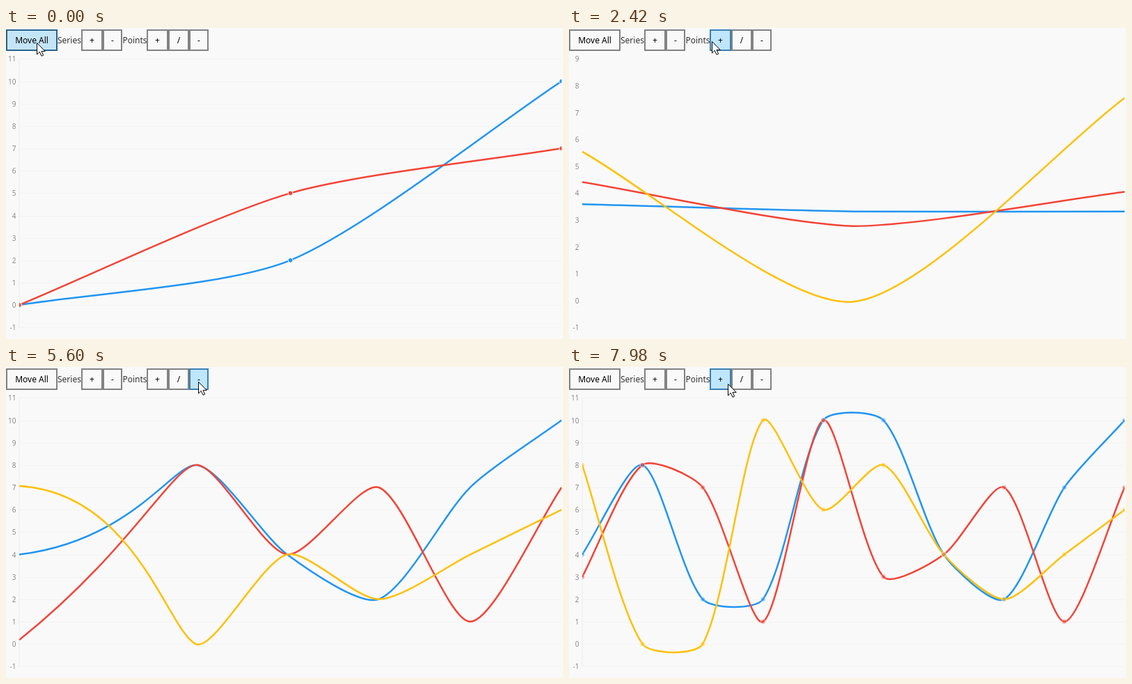
Recreate the animation shown at these times as an HTML page with a canvas. Size 800 by 447 pixels, loop 8 s.

```html
<!DOCTYPE html>
<html lang="en">
<head>
<meta charset="utf-8">
<title>Line chart</title>
<style>
html, body { margin: 0; width: 100%; height: 100%; overflow: hidden; background: #f9f9f9; }
canvas { display: block; }
</style>
</head>
<body>
<canvas id="stage" width="800" height="447"></canvas>
<script>
const ctx = document.getElementById('stage').getContext('2d');
const LOOP = 8000, MOVE = 500, FADE = 400;
const TOP = 44.4, BOTTOM = 430.3, RIGHT = 798;
const COLORS = ['#2195f2', '#f34336', '#fec007'];
const BACK = '#f9f9f9';

// label, left, right
const BUTTONS = [
  ['Move All', 0, 74], ['+', 108, 139], ['-', 139, 167],
  ['+', 202, 233], ['/', 233, 263], ['-', 263, 291]
];

// time, x, y of the pointer tip
const PATH = [
  [0, 44, 21], [200, 44, 21], [640, 118, 18], [900, 118, 18], [1500, 46, 20],
  [2190, 46, 20], [2420, 205, 19], [2520, 214, 21], [3200, 216, 21],
  [3560, 279, 22], [4400, 279, 22], [4900, 277, 21], [5620, 276, 21],
  [6250, 247, 18], [7350, 247, 18], [7700, 228, 24], [8000, 228, 24]
];

// Rows hold one value per series
const START = [[0, 0], [2, 5], [10, 7]];
const set = rows => () => rows;
const add = row => rows => [...rows, row];
const drop = rows => rows.slice(1);
const insert = row => rows => [...rows.slice(0, 2), row, ...rows.slice(2)];

// click time, button, press length, kind, change
const CLICKS = [
  [190, 0, 190, 'set', set([[8, 1], [3, 4], [3, 9]])],
  [860, 1, 90, 'series', rows => rows.map((r, i) => [...r, [9, 0, 9][i]])],
  [2170, 0, 100, 'set', set([[0, 8, 3], [4, 2, 0], [4, 0, 7]])],
  [2550, 3, 70, 'add', add([4, 3, 8])],
  [2680, 3, 70, 'add', add([8, 8, 0])],
  [2810, 3, 70, 'add', add([4, 4, 4])],
  [2935, 3, 70, 'add', add([2, 7, 2])],
  [3060, 3, 70, 'add', add([7, 1, 4])],
  [3180, 3, 70, 'add', add([10, 7, 6])],
  [4350, 5, 180, 'drop', drop],
  [4960, 5, 100, 'drop', drop],
  [5570, 5, 100, 'drop', drop],
  [6460, 4, 100, 'insert', insert([10, 3, 8])],
  [6760, 4, 100, 'insert', insert([10, 10, 6])],
  [7050, 4, 100, 'insert', insert([2, 1, 10])],
  [7320, 4, 100, 'insert', insert([2, 7, 0])]
];

const clamp = v => Math.max(0, Math.min(1, v));
const mix = (a, b, k) => Array.isArray(a) ? a.map((v, i) => mix(v, b[i], k)) : a + (b - a) * k;
const endOf = part => part.slice(-2);
const still = p => [...p, ...p, ...p];

function axisOf(rows) {
  const all = rows.flat();
  const lo = Math.min(...all) - 1, hi = Math.max(...all) + 1;
  return { lo, hi, left: lo < 0 ? 19 : 21.5 };
}

const yOf = (v, axis) => BOTTOM - (v - axis.lo) / (axis.hi - axis.lo) * (BOTTOM - TOP);

// Control points of the smooth segment from b to c
function segment(a, b, c, d) {
  const dist = (p, q) => Math.hypot(p[0] - q[0], p[1] - q[1]);
  const l1 = dist(a, b), l2 = dist(b, c), l3 = dist(c, d);
  const ab = mix(a, b, 0.5), bc = mix(b, c, 0.5), cd = mix(c, d, 0.5);
  const m1 = mix(ab, bc, l1 / (l1 + l2)), m2 = mix(bc, cd, l2 / (l2 + l3));
  const pull = (p, m) => p.map((v, i) => v + (bc[i] - m[i]) * 0.5);
  return [...pull(b, m1), ...pull(c, m2), ...c];
}

// A curve is its start point followed by Bezier segments
function curves(rows, axis) {
  const step = (RIGHT - axis.left) / (rows.length - 1);
  return rows[0].map((_, s) => {
    const p = rows.map((r, i) => [axis.left + i * step, yOf(r[s], axis)]);
    const at = i => p[Math.max(0, Math.min(p.length - 1, i))];
    return p.map((q, i) => i ? segment(at(i - 2), at(i - 1), q, at(i + 1)) : q);
  });
}

// Reshape the current curves so they pair up with the next ones
function pair(now, kind, next) {
  if (kind === 'series')
    return [...now, next[2].map(part => part.map((v, i) => i % 2 ? BOTTOM : v))];
  return now.map(c => {
    if (kind === 'add') return [...c, still(endOf(c[c.length - 1]))];
    if (kind === 'drop') return [c[0], ...c.slice(2)];
    if (kind === 'insert') return [...c.slice(0, 3), still(endOf(c[2])), ...c.slice(3)];
    return c;
  });
}

const shapeAt = (stage, t) => mix(stage.from, stage.to, clamp((t - stage.time) / MOVE));

function buildStages() {
  let rows = START, axis = axisOf(rows), to = curves(rows, axis);
  const list = [{ time: -LOOP, gridTime: -LOOP, axis, from: to, to }];
  for (const [time, , , kind, change] of CLICKS) {
    const last = list[list.length - 1];
    rows = change(rows);
    axis = axisOf(rows);
    to = curves(rows, axis);
    const same = axis.lo === last.axis.lo && axis.hi === last.axis.hi;
    list.push({
      time, axis, to,
      gridTime: same ? last.gridTime : time,
      from: pair(shapeAt(last, time), kind, to)
    });
  }
  return list;
}
const stages = buildStages();

function pointerAt(t) {
  const i = Math.max(1, PATH.findIndex(p => p[0] > t));
  const [t0, ...a] = PATH[i - 1], [t1, ...b] = PATH[i];
  const k = clamp((t - t0) / (t1 - t0));
  return mix(a, b, k * k * (3 - 2 * k));
}

function text(str, x, y, size, color, align) {
  ctx.font = size + 'px "Noto Sans", "Open Sans", sans-serif';
  ctx.textAlign = align;
  ctx.textBaseline = 'alphabetic';
  ctx.fillStyle = color;
  ctx.fillText(str, x, y);
}

function drawAxis({ axis, gridTime }, t) {
  const { lo, hi, left } = axis;
  ctx.globalAlpha = clamp((t - gridTime - 300) / 200);
  ctx.fillStyle = '#f3f3f3';
  for (let v = lo; v <= hi; v++) ctx.fillRect(left, Math.round(yOf(v, axis)), RIGHT - left, 1);
  ctx.fillRect(Math.floor(left) - 1, 44, 2, 387);
  ctx.globalAlpha = 1;
  for (let v = lo; v <= hi; v++) text(String(v), left - 4.5, yOf(v, axis) + 4, 10, '#8a8a8a', 'right');
}

function drawSeries(stage, t) {
  ctx.save();
  ctx.beginPath();
  ctx.rect(stage.axis.left, 34, RIGHT - stage.axis.left, 413);
  ctx.clip();
  ctx.lineWidth = 2.5;
  ctx.lineJoin = 'round';
  shapeAt(stage, t).forEach((curve, s) => {
    ctx.beginPath();
    ctx.moveTo(...curve[0]);
    curve.slice(1).forEach(seg => ctx.bezierCurveTo(...seg));
    ctx.strokeStyle = COLORS[s];
    ctx.stroke();
  });
  ctx.globalAlpha = clamp((t - stage.time - MOVE) / FADE);
  ctx.lineWidth = 1;
  stage.to.forEach((curve, s) => curve.forEach(part => {
    const [x, y] = endOf(part);
    ctx.beginPath();
    ctx.arc(x, y, 3.4, 0, 7);
    ctx.fillStyle = COLORS[s];
    ctx.fill();
    ctx.strokeStyle = BACK;
    ctx.stroke();
  }));
  ctx.restore();
}

function drawToolbar(t, [px, py]) {
  const press = CLICKS.find(c => t >= c[0] - c[2] && t < c[0]);
  text('Series', 74, 22, 12, '#333', 'left');
  text('Points', 167.5, 22, 12, '#333', 'left');
  const box = ([label, x0, x1], i) => {
    const hover = px >= x0 && px < x1 && py < 33;
    const down = press && press[1] === i;
    ctx.fillStyle = down ? '#c4e5f6' : hover ? '#bee6fd' : BACK;
    ctx.strokeStyle = down ? '#2c628b' : hover ? '#3c7fb1' : '#828282';
    ctx.lineWidth = 2;
    ctx.fillRect(x0 + 1, 3, x1 - x0 - 2, 29);
    ctx.strokeRect(x0 + 1, 3, x1 - x0 - 2, 29);
    text(label, (x0 + x1) / 2, 22, 12, '#000', 'center');
  };
  BUTTONS.forEach(box);
}

const ARROW = new Path2D('M.5.5V17L4.3 13.3 7 19.3 9.6 18.2 7 12.4H12.2Z');
function drawPointer([x, y]) {
  ctx.save();
  ctx.translate(Math.round(x), Math.round(y));
  ctx.fillStyle = '#fff';
  ctx.strokeStyle = '#000';
  ctx.lineWidth = 1;
  ctx.fill(ARROW);
  ctx.stroke(ARROW);
  ctx.restore();
}

function draw(t) {
  const stage = stages.filter(s => s.time <= t).pop();
  const pointer = pointerAt(t);
  ctx.fillStyle = BACK;
  ctx.fillRect(0, 0, 800, 447);
  drawAxis(stage, t);
  drawSeries(stage, t);
  drawToolbar(t, pointer);
  drawPointer(pointer);
}

let begin = null;
function tick(now) {
  if (begin === null) begin = now;
  draw((now - begin) % LOOP);
  requestAnimationFrame(tick);
}
draw(0);
requestAnimationFrame(tick);
</script>
</body>
</html>
```
